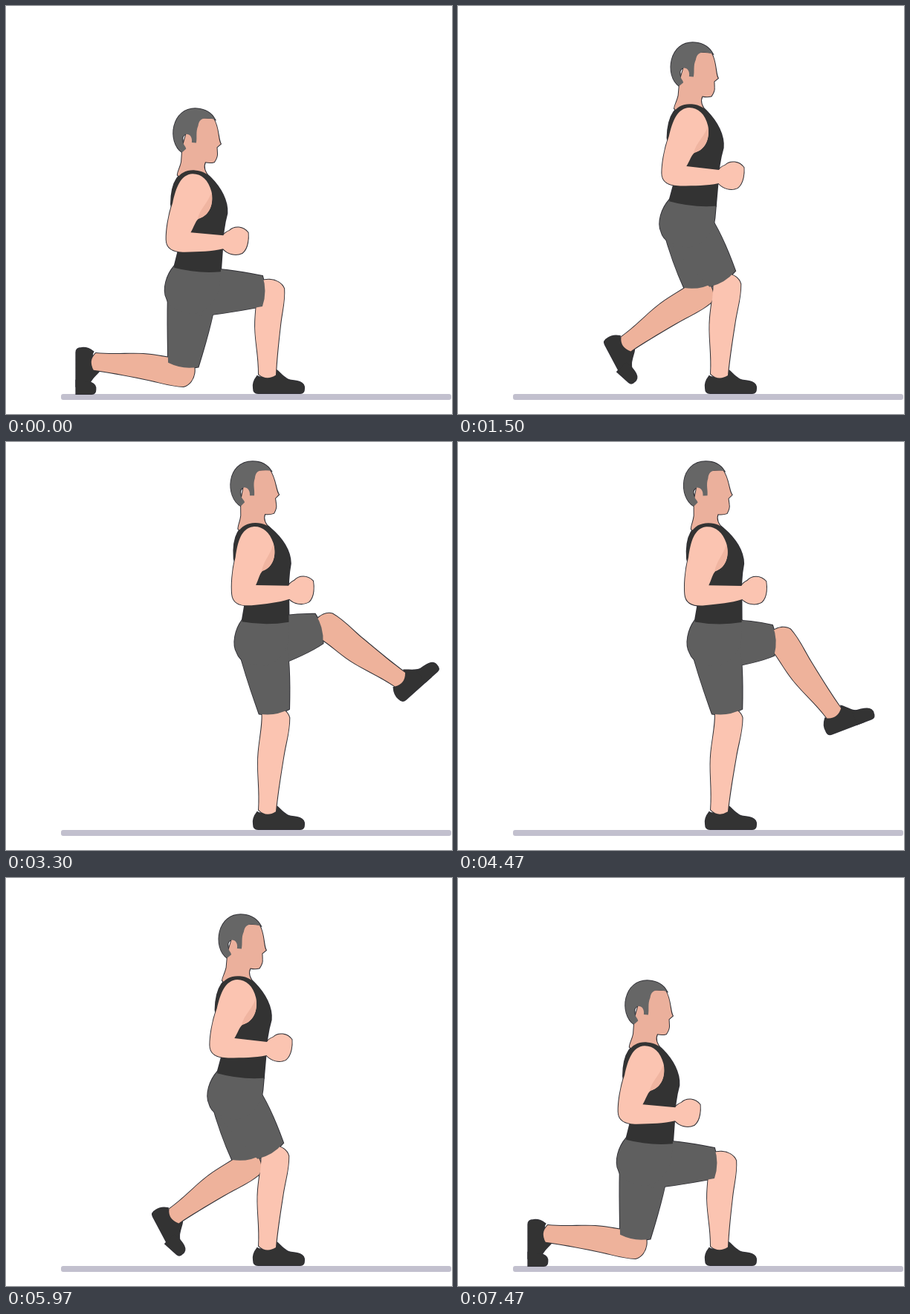
Animation, 600 px wide and 550 px high, one loop 7770 ms. Source, as an HTML page with a canvas:

```html
<!DOCTYPE html>
<html lang="en">
<head>
<meta charset="utf-8">
<title>Lunge with kick</title>
<style>
  html, body { margin: 0; width: 100%; height: 100%; overflow: hidden; background: #fff; }
  canvas { display: block; }
</style>
</head>
<body>
<canvas id="stage" width="600" height="550"></canvas>
<script>
const ctx = document.getElementById('stage').getContext('2d');
const LOOP = 7770, STEP = 300, PEAK = 3735;
const BONE = 120; // length at which the shin is drawn
const ANKLE = [351, 497];
const RAD = Math.PI / 180;

const color = {
  near: '#fbc4b1', far: '#eeb29b', face: '#ebb09c', shade: '#f0b5a1',
  hair: '#666', shirt: '#333', shorts: '#5f5f5f', shoe: '#333',
  edge: '#303036', floor: '#c2c0ce'
};

// time, waist x, y, lean, near knee x, y,
// far thigh angle, length, far shin angle, length, foot angle, toe bend
const poses = [
  [0,    258, 355, 4,      356, 384,  98, 112, 187.6, 119,  90, 90],
  [900,  274, 296, 10,     356, 381, 120, 101, 149,   124,  54, 54],
  [1500, 316, 266, 5,      362, 377,  80,  94, 146,   122,  62, 20],
  [2100, 354, 243, 0,      368, 374,  32,  86, 110,   122,  42,  0],
  [3300, 349.5, 242, -.5,  363, 374, -15,  88, 36.4,  122, -42,  0],
  [3735, 349, 242, -.5,    362, 374, -24,  90, 18,    122, -58,  0]
];

const path = d => new Path2D(d);

// Limbs run along x, front side towards negative y.
const shin = path('M-4-18C15-20 30-16 50-15C80-13 100-12 120-12Q129 0 120 11C90 12 70 19 45 19C25 19 10 17-5 19C-20 17-20-12-4-18Z');
const heel = path('M-13 2C-17 7-19 12-18 18Q-18 25-12 25L34 25L36 10C32 8 27 7 23 3C19 0 16-4 13-6C12 3-9 5-13 2Z');
const toe = path('M-10-8C8-7 17-5 16 4Q16 10 11 10L-10 10Z');
const thigh = length => {
  const cuff = length - 11;
  return path(`M0-30C20-31 45-29 ${cuff}-20Q${cuff + 7} 0 ${cuff} 21C60 27 40 31 0 35Z`);
};
const pelvis = path('M-32-2C-41 10-46 30-39 42C-35 54-20 60 0 60C20 55 31 35 31 17L31-2Z');

// Upper body, drawn upright with the waist at 354, 243.
const head = path('M322 80L322 100C321 108 318 113 318 118L326 124L364 124C358 114 350 108 354 98Q361 99 366 97Q370 90 369 85L368 77L373 72C369 67 369 50 361 39L330 40Z');
const hair = path('M322 87C301 75 303 27 338 27C350 27 358 32 363 40C350 38 342 38 341 50C338 58 341 66 340 73L334 73C335 60 322 59 321 68C321 76 326 78 327 82Z');
const shirt = path('M312 158C310 128 319 110 341 110C352 110 358 114 362 118C377 131 388 148 388 165C385 180 384 195 385 215L385 244Q354 249 322 243L327 215Z');
const arm = path('M338 115C322 117 317 135 314 156C309 175 308 195 309 206C310 218 320 222 335 221C355 219 370 218 386 213C392 219 403 222 412 217C420 210 419 195 418 189C411 181 399 181 393 188Q387 191 385 195L341 194C345 186 346 179 350 175C367 169 369 150 365 137C360 122 350 114 338 115Z');
const armShade = path('M365 139C369 152 366 170 349 175C352 160 360 155 365 139Z');

function poseAt(time) {
  const i = Math.max(1, poses.findIndex(p => p[0] >= time));
  const a = poses[i - 1], b = poses[i];
  const k = (time - a[0]) / (b[0] - a[0]);
  return a.map((v, n) => v + (b[n] - v) * k);
}

// The movement advances in held steps, then runs backwards from its peak.
function heldTime(time) {
  if (time < PEAK) return Math.floor(time / STEP) * STEP;
  const turn = 3870;
  if (time < turn) return PEAK;
  return 3600 - Math.floor((time - turn) / STEP) * STEP;
}

const polar = ([x, y], angle, length) =>
  [x + length * Math.cos(angle * RAD), y + length * Math.sin(angle * RAD)];

function place([x, y], angle, draw) {
  ctx.save();
  ctx.translate(x, y);
  ctx.rotate(angle * RAD);
  draw();
  ctx.restore();
}

function along(from, to, draw) {
  const dx = to[0] - from[0], dy = to[1] - from[1];
  place(from, Math.atan2(dy, dx) / RAD, () => draw(Math.hypot(dx, dy)));
}

function lowerLeg(knee, ankle, footAngle, bend, skin, paint) {
  place(ankle, footAngle, () => {
    paint(heel, color.shoe);
    place([34, 15], -bend, () => paint(toe, color.shoe));
  });
  along(knee, ankle, length => {
    ctx.scale(length / BONE, 1);
    paint(shin, skin);
  });
}

function figure(pose, paint) {
  const [, x, y, lean, kneeX, kneeY, thighAngle, thighLength, shinAngle, shinLength, foot, bend] = pose;
  const waist = [x, y];
  const hip = polar(waist, lean + 96, 29.2);
  const nearKnee = [kneeX, kneeY];
  const farKnee = polar(hip, thighAngle, thighLength);
  const farAnkle = polar(farKnee, shinAngle, shinLength);

  lowerLeg(farKnee, farAnkle, foot, bend, color.far, paint);
  lowerLeg(nearKnee, ANKLE, 0, 0, color.near, paint);
  for (const knee of [farKnee, nearKnee])
    along(hip, knee, length => paint(thigh(length), color.shorts));

  place(waist, lean, () => {
    paint(pelvis, color.shorts);
    ctx.translate(-354, -243);
    paint(head, color.face);
    paint(hair, color.hair);
    paint(shirt, color.shirt);
    paint(arm, color.near);
    paint(armShade, color.shade);
  });
}

function outline(shape) {
  ctx.strokeStyle = color.edge;
  ctx.lineWidth = 2;
  ctx.stroke(shape);
}

function fill(shape, style) {
  ctx.fillStyle = style;
  ctx.fill(shape);
}

function floor() {
  ctx.beginPath();
  ctx.roundRect(74, 523, 525, 8, 3);
  ctx.fillStyle = color.floor;
  ctx.fill();
}

function frame() {
  const pose = poseAt(heldTime(performance.now() % LOOP));
  ctx.fillStyle = '#fff';
  ctx.fillRect(0, 0, 600, 550);
  floor();
  figure(pose, outline);
  figure(pose, fill);
  requestAnimationFrame(frame);
}
frame();
</script>
</body>
</html>
```
